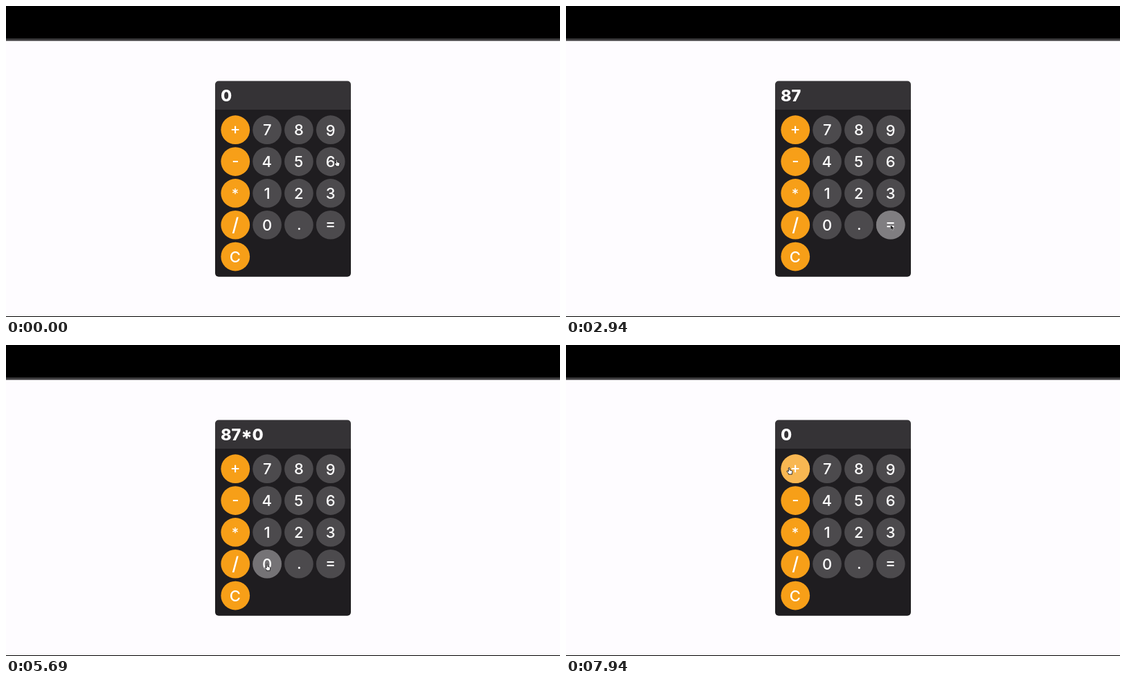
An HTML page with a canvas for the animation above (8000 ms loop, 800 by 450 pixels).

```html
<!DOCTYPE html>
<html lang="en">
<head>
<meta charset="utf-8">
<title>Calculator</title>
<style>
  html, body { margin: 0; width: 100%; height: 100%; overflow: hidden; background: #fefcff; }
  canvas { display: block; width: 800px; height: 450px; }
</style>
</head>
<body>
<canvas id="stage" width="800" height="450"></canvas>
<script>
const ctx = document.getElementById('stage').getContext('2d');
const LOOP = 8000, TICK = 62.5, START = 250, FADE_TICKS = 5;
const PITCH = 45.85, RADIUS = 20.85;
const FONT = 'Inter, "Open Sans", sans-serif';

const buttons = [...'+789-456*123/0.=C'].map((label, i) => ({
  label,
  x: 400 + (i % 4 - 1.5) * PITCH,
  y: 179.2 + Math.floor(i / 4) * PITCH,
  color: i % 4 ? '#4c4a4d' : '#f79f18',
  hover: i % 4 ? '#807e81' : '#fbc879'
}));

// Each visit rests on a button until `at`; a press there changes the readout.
// `dx`, `dy`: where on the button the pointer rests.
const visits = [
  { on: '6', at: START, dx: 8.5, dy: -3, shows: '0' },
  { on: 'C', at: 500 },
  { on: '7', at: 1180, dy: 9, shows: '7' },
  { on: '8', at: 1430, shows: '78' },
  { on: '+', at: 1740, shows: '78+' },
  { on: '9', at: 2240, dx: 3, dy: 5, shows: '78+9' },
  { on: '=', at: 2930, shows: '87' },
  { on: 'C', at: 3300 },
  { on: '+', at: 3600 },
  { on: '/', at: 4300, dx: 6, dy: -1 },
  { on: 'C', at: 4500 },
  { on: '*', at: 5055, dx: -9, dy: -13, shows: '87*' },
  { on: 'C', at: 5330 },
  { on: '0', at: 5680, shows: '87*0' },
  { on: '=', at: 6365, dx: -7, dy: -4, shows: '0' },
  { on: '/', at: 6750 },
  { on: '+', at: 7200 },
  { on: '0', at: 7560 },
  { on: '+', at: LOOP, dx: -9, dy: -2 }
].map(({ on, at, dx = 0, dy = 0, shows }) => {
  const b = buttons.find(b => b.label === on);
  return { at, shows, x: b.x + dx, y: b.y + dy };
});

// Between visits: a short rest, an eased glide, then a rest on the next button
function pointerAt(t) {
  const i = visits.findIndex(v => v.at > t);
  if (i < 1) return visits.at(i);
  const a = visits[i - 1], b = visits[i];
  const u = Math.min(1, Math.max(0, ((t - a.at) / (b.at - a.at) - 0.15) / 0.4));
  const s = u * u * (3 - 2 * u);
  return { x: a.x + (b.x - a.x) * s, y: a.y + (b.y - a.y) * s };
}

function readoutAt(t) {
  const last = visits.findLast(v => v.shows && v.at <= t);
  return last ? last.shows : '0';
}

const isOver = (b, p) => Math.hypot(p.x - b.x, p.y - b.y) < RADIUS;

// Replays the hover fades up to the given time
function hoverLevels(t) {
  const levels = buttons.map(() => 0);
  for (let s = START + TICK; s <= t; s += TICK) {
    const p = pointerAt(s);
    buttons.forEach((b, i) => {
      const step = (isOver(b, p) ? 1 : -1) / FADE_TICKS;
      levels[i] = Math.min(1, Math.max(0, levels[i] + step));
    });
  }
  return levels;
}

function rect(color, x, y, w, h, radii = 0) {
  ctx.fillStyle = color;
  ctx.beginPath();
  ctx.roundRect(x, y, w, h, radii);
  ctx.fill();
}

function disc(color, { x, y }) {
  ctx.fillStyle = color;
  ctx.beginPath();
  ctx.arc(x, y, RADIUS, 0, 2 * Math.PI);
  ctx.fill();
}

// Centres the ink of a label on its button
function drawLabel({ label, x, y }) {
  const size = { '/': 27, '*': 20 }[label] || 22;
  const drop = { '.': 5, '*': -2.5 }[label] || 0;
  ctx.font = `500 ${size}px ${FONT}`;
  const m = ctx.measureText(label);
  ctx.fillStyle = '#fff';
  ctx.fillText(label,
    x + (m.actualBoundingBoxLeft - m.actualBoundingBoxRight) / 2,
    y + drop + (m.actualBoundingBoxAscent - m.actualBoundingBoxDescent) / 2);
}

const hand = new Path2D('M-1 .8Q0-.6 1 .8V4.2L4 5Q5.4 5.4 5.2 7L4.6 9.2V11H-1V9.8L-3.6 6.6Q-3.8 5-2.4 5.4L-1 6.6Z');
const arrow = new Path2D('M0 0V8L1.9 6.4L3.2 9.2L4.6 8.6L3.4 5.9H5.8Z');

function drawPointer({ x, y }, isHand) {
  const shape = isHand ? hand : arrow;
  ctx.save();
  ctx.translate(x, y);
  ctx.scale(0.9, 0.9);
  ctx.lineJoin = 'round';
  ctx.fillStyle = isHand ? '#fff' : '#111';
  ctx.strokeStyle = isHand ? '#151316' : '#a9a7aa';
  ctx.fill(shape);
  ctx.stroke(shape);
  ctx.restore();
}

function draw(time) {
  const t = Math.floor((time % LOOP + 5) / TICK) * TICK;
  rect('#fefcff', 0, 0, 800, 450);
  rect('#3c3b3d', 0, 0, 800, 50.4);
  rect('#000', 0, 0, 800, 47);
  rect('#000', 0, 449, 800, 1);
  rect('#353336', 302, 108.5, 196, 42, [5, 5, 0, 0]);
  rect('#1f1d20', 302, 150, 196, 241.7, [0, 0, 5, 5]);

  ctx.font = `800 23.5px ${FONT}`;
  ctx.fillStyle = '#fff';
  ctx.fillText(readoutAt(t), 310, 137.8);

  const levels = hoverLevels(t);
  buttons.forEach((b, i) => {
    disc(b.color, b);
    ctx.globalAlpha = levels[i];
    disc(b.hover, b);
    ctx.globalAlpha = 1;
    drawLabel(b);
  });

  const p = pointerAt(t);
  drawPointer(p, buttons.some(b => b.label !== '=' && isOver(b, p)));
}

const origin = performance.now();
function frame() {
  draw(performance.now() - origin);
  requestAnimationFrame(frame);
}
frame();
</script>
</body>
</html>
```
